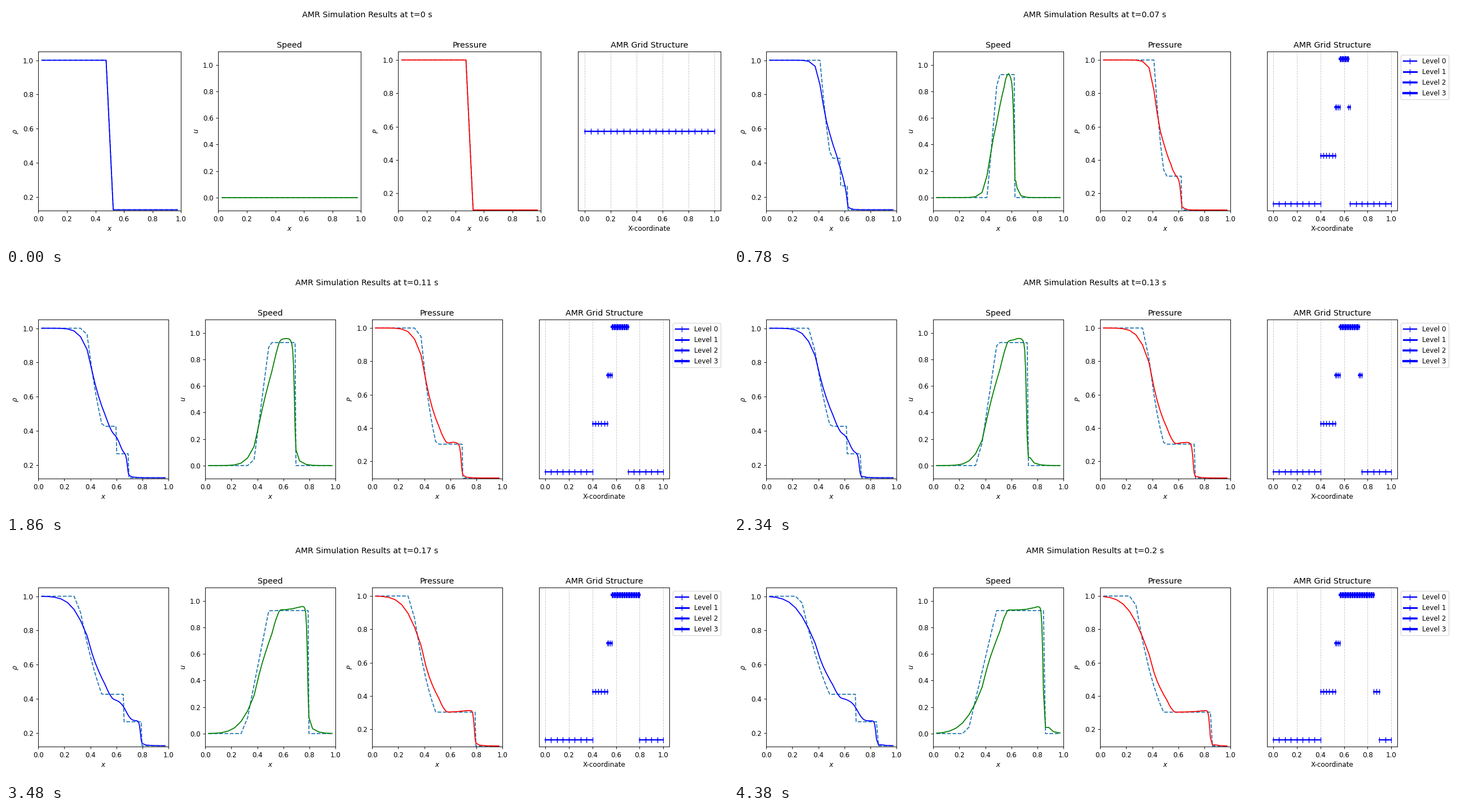
Recreate the animation shown at these times as a matplotlib script. Size 1280 by 427 pixels, loop 4.44 s.

```python
import numpy as np
import matplotlib.pyplot as plt
from matplotlib.animation import FuncAnimation

W, H, DPI = 1280, 427, 256 / 3
TOP, BOTTOM, LEFT = 81.3, 364.4, 57.3
GAMMA = 1.4

# Shock tube with a diaphragm at x = 0.5: constants of the exact solution
C_LEFT = np.sqrt(GAMMA)
P_STAR, U_STAR = 0.30313, 0.92745
RHO_3, RHO_4 = 0.42632, 0.26557
V_SHOCK = 1.75216
V_TAIL = U_STAR - np.sqrt(GAMMA * P_STAR / RHO_3)

# Left limit of each refinement level, and how far it runs ahead of the shock
FLOORS = (0.4, 0.525, 0.5625)
LEAD = 0.0028

# Time steps shrink while the grid gains levels, then stay nearly constant
TIMES = np.concatenate([
    [0, 0.0338, 0.0453],
    np.linspace(0.0504, 0.0723, 10, endpoint=False),
    np.linspace(0.0723, 0.2, 61),
])


def exact(x, t):
    """Density, velocity and pressure of the exact solution."""
    if t == 0:
        left = x < 0.5
        return np.where(left, 1, 0.125), 0 * x, np.where(left, 1, 0.1)
    xi = (x - 0.5) / t
    fan = 2 / (GAMMA + 1) - (GAMMA - 1) / (GAMMA + 1) / C_LEFT * xi
    zones = [xi < -C_LEFT, xi < V_TAIL, xi < U_STAR, xi < V_SHOCK]
    rho = np.select(zones, [1, fan**5, RHO_3, RHO_4], 0.125)
    u = np.select(zones, [0, 2 / (GAMMA + 1) * (C_LEFT + xi), U_STAR, U_STAR], 0)
    p = np.select(zones, [1, fan**7, P_STAR, P_STAR], 0.1)
    return rho, u, p


def primitive(q):
    rho, mom, energy = q
    u = mom / rho
    return rho, u, (GAMMA - 1) * (energy - 0.5 * mom * u)


def advance(q, dx, dt):
    """One first-order finite-volume step with HLL fluxes."""
    g = np.pad(q, ((0, 0), (1, 1)), mode="edge")
    rho, u, p = primitive(g)
    c = np.sqrt(GAMMA * p / rho)
    f = np.array([g[1], g[1] * u + p, (g[2] + p) * u])
    slow, fast = u - c, u + c
    sl = np.minimum(0, np.minimum(slow[:-1], slow[1:]))
    sr = np.maximum(0, np.maximum(fast[:-1], fast[1:]))
    jump = g[:, 1:] - g[:, :-1]
    face = (sr * f[:, :-1] - sl * f[:, 1:] + sl * sr * jump) / (sr - sl)
    return q - dt / dx * (face[:, 1:] - face[:, :-1])


def refine(left, level, q, t):
    """Split cells by one level around and behind the shock."""
    floors = np.array(FLOORS + (9,))[level]
    reach = 0.5 + V_SHOCK * t + LEAD
    split = (left >= floors - 1e-9) & (left <= reach)
    count = 1 + split
    level = np.repeat(level + split, count)
    left = np.repeat(left, count)
    second = np.cumsum(count)[split] - 1
    left[second] += 0.05 / 2**level[second]
    return left, level, np.repeat(q, count, axis=1)


def simulate():
    left = np.arange(20) / 20
    level = np.zeros(20, int)
    rho, u, p = exact(left + 0.025, 0)
    q = np.array([rho, rho * u, p / (GAMMA - 1)])
    states = [(left, level, q)]
    for t0, t in zip(TIMES[:-1], TIMES[1:]):
        q = advance(q, 0.05 / 2**level, t - t0)
        left, level, q = refine(left, level, q, t)
        states.append((left, level, q))
    return states


states = simulate()

fig = plt.figure(figsize=(W / DPI, H / DPI), dpi=DPI)
heading = fig.suptitle("")
axes = [fig.add_axes([0.1 + 0.2 * i, 0.2, 0.1, 0.5], label=str(i)) for i in range(4)]
grid_ax = axes[3]
tenths = np.arange(6) / 5

panels = [
    ("", r"$\rho$", "b", (0.11875, 1.05), tenths[1:]),
    ("Speed", "$u$", "g", (-0.1, 1.1), tenths),
    ("Pressure", "$P$", "r", (0.095, 1.05), tenths[1:]),
]
curves = []
for ax, (title, name, color, ylim, yticks) in zip(axes, panels):
    ax.set(title=title, xlabel="$x$", ylabel=name, xlim=(0, 1), ylim=ylim,
           xticks=tenths, yticks=yticks)
    dashed, = ax.plot([], [], "--", color="C0")
    solid, = ax.plot([], [], color=color)
    curves.append((dashed, solid))

grid_ax.set(title="AMR Grid Structure", xlabel="X-coordinate",
            xlim=(-0.05, 1.05), xticks=tenths, yticks=[])
grid_ax.grid(True, axis="x", linestyle="--", alpha=0.7)
level_lines = [
    grid_ax.plot([], [], "b|-", lw=2 + 0.5 * k, ms=8, label=f"Level {k}")[0]
    for k in range(4)
]


def place_axes(width, pitch):
    for i, ax in enumerate(axes):
        ax.set_position([(LEFT + pitch * i) / W, 1 - BOTTOM / H,
                         width / W, (BOTTOM - TOP) / H])


def draw_grid(left, level):
    top = level.max()
    for k, line in enumerate(level_lines):
        a = left[level == k]
        x = np.stack([a, a + 0.05 / 2**k, np.full(len(a), np.nan)], axis=1).ravel()
        line.set_data(x, np.full(len(x), k))
    margin = 0.05 * top if top else 0.055
    grid_ax.set_ylim(-margin, top + margin)
    if top:
        place_axes(230.6, 296)
        grid_ax.legend(handles=level_lines[:top + 1], loc="upper left",
                       bbox_to_anchor=(1, 1))
    else:
        place_axes(253, 319)
        if grid_ax.get_legend():
            grid_ax.get_legend().remove()


def draw(n):
    t = TIMES[n]
    left, level, q = states[n]
    x = left + 0.025 / 2**level
    for (dashed, solid), ref, val in zip(curves, exact(x, t), primitive(q)):
        dashed.set_data(x, ref)
        solid.set_data(x, val)
    draw_grid(left, level)
    heading.set_text(f"AMR Simulation Results at t={round(t, 2):g} s")
    return []


anim = FuncAnimation(fig, draw, frames=len(TIMES), interval=60,
                     init_func=lambda: draw(0), repeat=True, repeat_delay=0)
plt.show()
```
